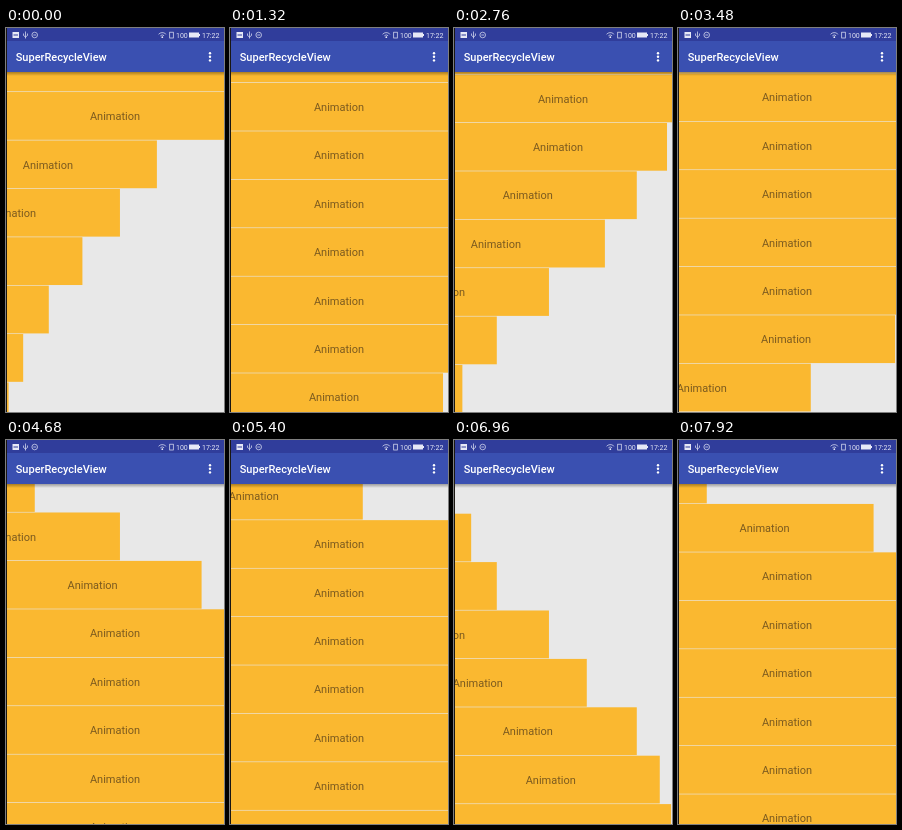
Write an HTML page with a canvas that moves like this. It is 218x384 px and loops after 8 s.

```html
<!DOCTYPE html>
<html lang="en">
<head>
<meta charset="utf-8">
<title>Sliding list</title>
<style>
  html, body { margin: 0; width: 100%; height: 100%; overflow: hidden; background: #e8e8e8; }
  canvas { display: block; width: 218px; height: 384px; }
</style>
</head>
<body>
<canvas id="stage"></canvas>
<script>
const W = 218, H = 384, LOOP = 8000;
const LIST_TOP = 45, PITCH = 48.4;
const SLIDE = 300, TICK = 1000 / 60, TICK_PHASE = 0.26;
const DECAY = 2.5;

const canvas = document.getElementById('stage');
const ctx = canvas.getContext('2d');
const ratio = window.devicePixelRatio || 1;
canvas.width = Math.round(W * ratio);
canvas.height = Math.round(H * ratio);

// Each fling eases out over its span unless the next one cuts it short.
// lag: seconds by which new rows attach late.
const flings = [
  { start: -190, end: 1520, travel: 1125.6, lag: -0.002 },
  { start: 1809, end: 3940, travel: 1884.2, lag: 0.0055 },
  { start: 3871, end: 6190, travel: -911, lag: -0.018 },
  { start: 5657.3, end: 8380, travel: -2834, lag: 0.0245 }
];

function flingState({ start, end, travel, from }, t) {
  const span = end - start;
  const left = Math.max(0, (end - t) / span);
  return {
    offset: from + travel * (1 - left ** DECAY),
    speed: travel * DECAY * left ** (DECAY - 1) / span * 1000
  };
}

flings.forEach((fling, i) => {
  fling.from = i ? flingState(flings[i - 1], fling.start).offset : -258.7;
});

const flingAt = t => flings.findLast(fling => fling.start <= t);
const scrollAt = t => flingState(flingAt(t), t);
const rowTop = (row, offset) => LIST_TOP + row * PITCH - offset;

// Walk the timeline once and note when each row is attached and detached.
function planRows() {
  const visits = [], open = new Map();
  const attach = (row, from) => {
    const visit = { row, from, to: Infinity };
    visits.push(visit);
    open.set(row, visit);
  };
  const detach = (row, to) => {
    open.get(row).to = to;
    open.delete(row);
  };
  const { start, from } = flings[0];
  let first = Math.floor(from / PITCH);
  let last = first - 1;
  while (rowTop(last + 1, from) < H) attach(++last, start - SLIDE);

  for (let t = start; t <= LOOP; t++) {
    const { travel, lag } = flingAt(t);
    const { offset, speed } = scrollAt(t);
    if (travel > 0) {
      while (rowTop(last + 1, offset) < H - lag * speed) attach(++last, t);
      while (rowTop(first + 1, offset) < LIST_TOP - 20) detach(first++, t);
    } else {
      while (rowTop(first, offset) > LIST_TOP - lag * speed) attach(--first, t);
      while (rowTop(last, offset) > H) detach(last--, t);
    }
  }
  return visits;
}

const visits = planRows();

// Accelerate-decelerate slide, advanced in whole display ticks.
function slideEdge(age) {
  const ticks = Math.round(age / TICK - TICK_PHASE) + TICK_PHASE;
  const p = Math.min(1, Math.max(0, ticks * TICK / SLIDE));
  return W * (1 - Math.cos(Math.PI * p)) / 2;
}

function box(color, x, y, w, h) {
  ctx.fillStyle = color;
  ctx.fillRect(x, y, w, h);
}

function label(text, x, y, font, color, align = 'left') {
  ctx.font = font + ' Roboto, sans-serif';
  ctx.fillStyle = color;
  ctx.textAlign = align;
  ctx.fillText(text, x, y);
}

function dot(x, y, r) {
  ctx.beginPath();
  ctx.arc(x, y, r, 0, Math.PI * 2);
  ctx.fill();
}

function line(...points) {
  ctx.beginPath();
  points.forEach(([x, y]) => ctx.lineTo(x, y));
  ctx.stroke();
}

function drawRows(t) {
  const { offset } = scrollAt(t);
  for (const { row, from, to } of visits) {
    if (t < from || t >= to) continue;
    const y = rowTop(row, offset);
    const edge = slideEdge(t - from);
    box('#fab830', edge - W, y + 0.4, W, PITCH - 0.6);
    label('Animation', edge - W / 2, y + 28.5, '11px', '#7b5a1f', 'center');
  }
}

function drawStatusBar() {
  const ink = '#e6e8f6';
  box('#303d9b', 0, 0, W, 13);
  box(ink, 6.5, 4, 6.5, 6);
  box('#303d9b', 7.5, 6.5, 4.5, 1);

  ctx.strokeStyle = ink;
  ctx.lineWidth = 0.7;
  line([19.5, 3.5], [19.5, 10.5]);
  line([17.5, 5.5], [17.5, 7.5], [19.5, 9], [21.5, 7.5], [21.5, 5.5]);
  ctx.beginPath();
  ctx.arc(28.7, 7, 2.8, 0, Math.PI * 2);
  ctx.stroke();
  line([27.3, 7], [30.1, 7]);

  for (const r of [2.6, 5]) {
    ctx.beginPath();
    ctx.arc(156.3, 9.6, r, -Math.PI * 0.77, -Math.PI * 0.23);
    ctx.stroke();
  }
  ctx.fillStyle = ink;
  dot(156.3, 9.2, 0.9);
  ctx.strokeRect(163.7, 4.2, 3.6, 5.8);
  label('100', 170, 9.6, '7px', ink);
  box(ink, 183, 4.5, 10, 5);
  box(ink, 193, 6, 1, 2);
  label('17:22', 196, 9.6, '7px', ink);
}

function drawToolbar() {
  const shade = ctx.createLinearGradient(0, 44, 0, 48);
  shade.addColorStop(0, 'rgba(0,0,0,.32)');
  shade.addColorStop(1, 'rgba(0,0,0,0)');
  box(shade, 0, 44, W, 4);
  box('#3a50b1', 0, 13, W, 31);
  label('SuperRecycleView', 9.7, 33, '500 11px', '#fff');
  ctx.fillStyle = '#fff';
  for (const y of [25.2, 28.8, 32.4]) dot(204, y, 1.2);
}

function draw(t) {
  ctx.setTransform(ratio, 0, 0, ratio, 0, 0);
  box('#e8e8e8', 0, 0, W, H);
  drawRows(t);
  drawToolbar();
  drawStatusBar();
  box('#1a1712', 0, 0, 1, H);
}

const began = performance.now();
function tick() {
  draw((performance.now() - began) % LOOP);
  requestAnimationFrame(tick);
}
tick();
</script>
</body>
</html>
```
